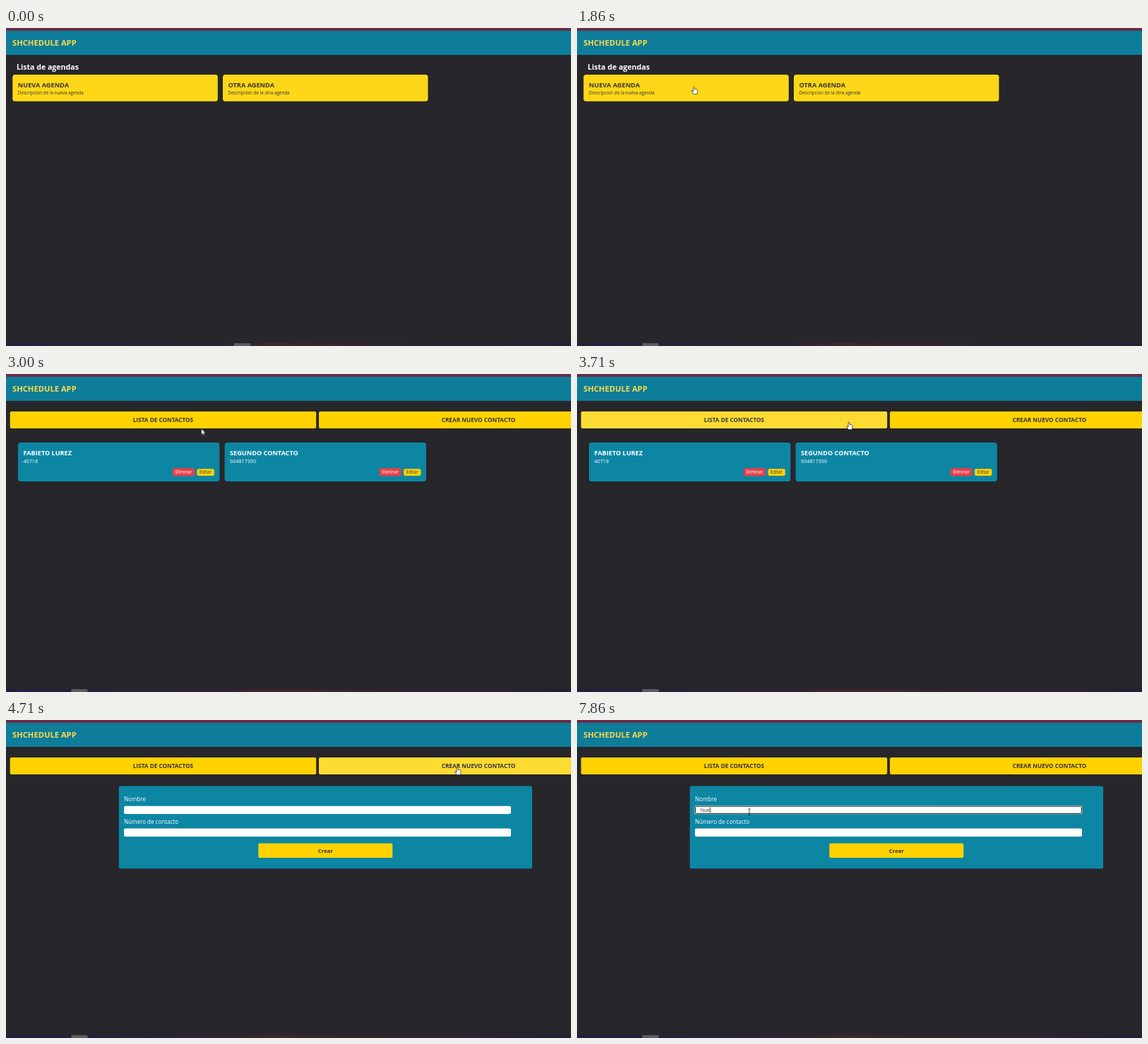
Write an HTML page that moves like this. It is 800 by 450 pixels and loops after 8000 ms.

```html
<!DOCTYPE html>
<html lang="es">
<head>
<meta charset="utf-8">
<title>Agenda</title>
<style>
html, body { margin: 0; width: 100%; height: 100%; overflow: hidden; background: #27262a; }
svg { display: block; width: 800px; height: 450px; }
text { font-family: "Open Sans", "Noto Sans", sans-serif; fill: #fff; }
.b { font-weight: 700; }
.mid { text-anchor: middle; }
.dark { fill: #383338; }
.gold { fill: #ffd200; }
.sun { fill: #fdd718; }
.teal { fill: #0d86a4; }
.white { fill: #fff; }
.red { fill: #e5404b; }
</style>
</head>
<body>
<svg viewBox="0 0 800 450">
  <defs>
    <linearGradient id="bar">
      <stop offset="0" stop-color="#241f40"/>
      <stop offset=".36" stop-color="#2a2236"/>
      <stop offset=".47" stop-color="#40272d"/>
      <stop offset=".62" stop-color="#34252f"/>
      <stop offset="1" stop-color="#241f3a"/>
    </linearGradient>
  </defs>
  <rect width="800" height="450" fill="#27262a"/>
  <rect width="800" height="4" fill="#6b2c48"/>
  <rect y="4" width="800" height="34" fill="#0d7d9a"/>
  <text class="b" x="9" y="25.3" font-size="11.2" style="fill:#fbd94a">SHCHEDULE APP</text>
  <rect y="446" width="800" height="4" fill="url(#bar)"/>
  <rect id="task" y="446" width="23" height="4" fill="#5c5a62"/>
  <g id="agendas"></g>
  <g id="tabs"></g>
  <g id="contacts"></g>
  <g id="form"></g>
  <g id="focus">
    <rect x="166.5" y="121.2" width="549" height="12.1" rx="2" fill="#fff"/>
    <rect x="167.5" y="122.2" width="547" height="10.1" rx="1" fill="#fff" stroke="#18181b"/>
    <text id="typed" class="dark" x="174.7" y="130" font-size="6.8"></text>
    <rect id="caret" y="123.5" width=".8" height="7.5" fill="#222"/>
  </g>
  <g id="mouse">
    <path id="arrow" d="M0 0V8.2L1.9 6.5 3.2 9.3 4.6 8.7 3.3 6H5.8Z" fill="#fff" stroke="#222" stroke-width=".6"/>
    <path id="hand" d="M-.9 .6Q0-.6 .9 .6V3.4L4.4 4.2Q5.3 4.6 5.2 6L4.4 10.6H-.6L-3.2 6.8Q-3.4 5.6-2.2 5.8L-.9 7Z" fill="#fff" stroke="#222" stroke-width=".7"/>
    <path id="beam" d="M-1.7-4H1.7M0-4V4M-1.7 4H1.7" fill="none" stroke="#222" stroke-width=".8"/>
  </g>
</svg>
<script>
const $ = id => document.getElementById(id);
const box = (cls, x, y, w, h, r = 2) =>
  `<rect class="${cls}" x="${x}" y="${y}" width="${w}" height="${h}" rx="${r}"/>`;
const label = (cls, x, y, size, s) =>
  `<text class="${cls}" x="${x}" y="${y}" font-size="${size}">${s}</text>`;

const agenda = (x, title, note) => box('sun', x, 66, 290.5, 37.7, 3.5) +
  label('b dark', x + 7.5, 83.9, 9.2, title) +
  label('dark', x + 7.5, 94.1, 6.3, note);

const contact = (x, name, phone) => box('teal', x, 97, 285.3, 55, 3.5) +
  label('b', x + 7.5, 115.2, 9.15, name) +
  label('', x + 7.5, 126.4, 7.2, phone) +
  box('red', x + 219, 133.3, 31, 11.2) +
  label('mid', x + 234.5, 141.1, 6.2, 'Eliminar') +
  box('gold', x + 253.5, 134.3, 24.3, 9.6) +
  label('mid dark', x + 265.6, 141.3, 6.2, 'Editar');

$('agendas').innerHTML = label('b', 15, 59.4, 10.6, 'Lista de agendas') +
  agenda(9.3, 'NUEVA AGENDA', 'Descripcion de la nueva agenda') +
  agenda(307, 'OTRA AGENDA', 'Descripcion de la otra agenda');

$('tabs').innerHTML = box('gold', 5.7, 53, 433.5, 24) + box('gold', 443, 53, 433.5, 24) +
  label('b mid dark', 222.5, 67.9, 8.2, 'LISTA DE CONTACTOS') +
  label('b mid dark', 669, 67.9, 8.25, 'CREAR NUEVO CONTACTO');

$('contacts').innerHTML = contact(17, 'FABIETO LUREZ', '40718') +
  contact(309.6, 'SEGUNDO CONTACTO', '604817390');

$('form').innerHTML = box('teal', 159.8, 93.5, 585.2, 116.7) +
  label('', 167, 114.6, 8.05, 'Nombre') + box('white', 167, 121.7, 548, 11.3) +
  label('', 167, 146.6, 8.05, 'Número de contacto') + box('white', 167, 153.6, 548, 11.3) +
  box('gold', 357.3, 174.5, 190, 20.5) +
  label('b mid dark', 452.4, 187.8, 7.8, 'Crear');

// Pointer stops: step, x, y
const path = [
  [1, 335, 449], [11, 165.5, 83], [13, 165.5, 83], [16, 168.5, 87],
  [26, 385, 68], [31, 639, 67], [33, 639, 67], [38, 244, 130], [56, 244, 130]
];

function pointer(n) {
  const i = path.findIndex(p => p[0] >= n);
  if (i < 1) return path[0].slice(1);
  const [a, b] = [path[i - 1], path[i]];
  const u = (n - a[0]) / (b[0] - a[0]), k = u * u * (3 - 2 * u);
  return [a[1] + (b[1] - a[1]) * k, a[2] + (b[2] - a[2]) * k];
}

const show = (id, on) => { $(id).style.display = on ? '' : 'none'; };
const tabs = $('tabs').querySelectorAll('rect');

function draw(n) {
  const list = n < 14, form = n >= 33;
  show('agendas', list);
  show('tabs', !list);
  show('contacts', !list && !form);
  show('form', form);
  show('focus', n >= 41);
  $('task').setAttribute('x', n < 1 ? 323 : 92.5);

  const [x, y] = pointer(n);
  const inside = (l, t, r, b) => x > l && x < r && y > t && y < b;
  const over = [inside(5, 53, 439, 77), inside(443, 53, 800, 77)];
  tabs.forEach((tab, i) => { tab.style.fill = over[i] ? '#fddb33' : ''; });
  const hand = list ? inside(9, 66, 300, 104) || inside(307, 66, 597, 104) : over[0] || over[1];
  const beam = form && (inside(167, 121, 715, 133) || inside(167, 153, 715, 165));
  show('mouse', n >= 1);
  show('hand', hand);
  show('beam', beam);
  show('arrow', !hand && !beam);
  $('mouse').setAttribute('transform', `translate(${x} ${y})`);

  const word = n < 52 ? '' : n < 53 ? 'N' : 'Nue';
  $('typed').textContent = word;
  $('caret').setAttribute('x', 174.7 + (word ? $('typed').getComputedTextLength() + .2 : 0));
  show('caret', n < 45 || n >= 48);
}

// Seven picture steps per second
function tick() {
  draw(Math.floor((performance.now() % 8000 + 5) * 7 / 1000) % 56);
  requestAnimationFrame(tick);
}
tick();
</script>
</body>
</html>
```
